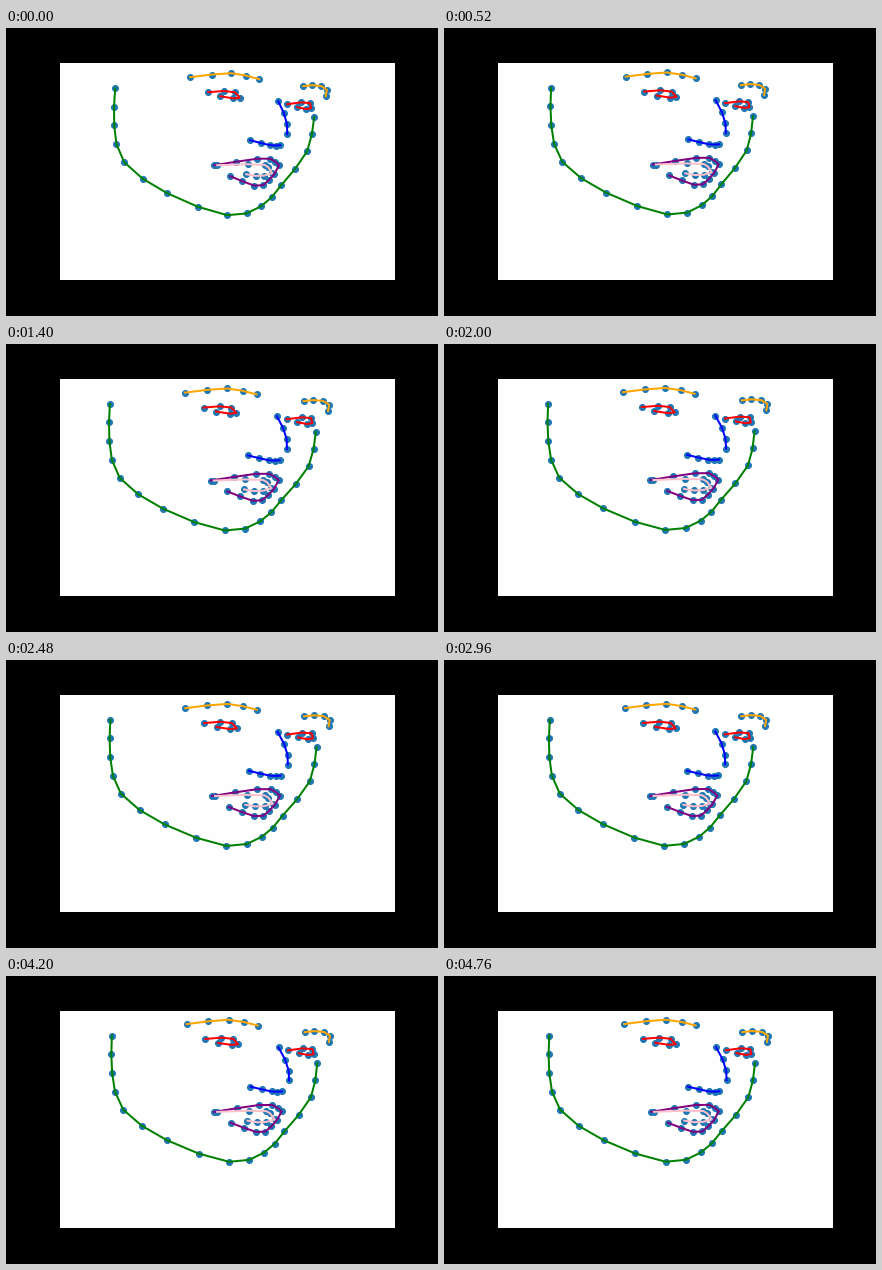
A matplotlib script for the animation above (4.8 s loop, 432 px wide and 288 px high).

```python
import numpy as np
import matplotlib.pyplot as plt
from matplotlib.animation import FuncAnimation

W, H, DPI = 432, 288, 72
FRAMES, STEP = 120, 40


def hermite(knots, values, t):
    """Smooth curve through values (one row per knot), sampled at t."""
    values = np.asarray(values, float)
    slopes = np.gradient(values, knots, axis=0)
    i = np.clip(np.searchsorted(knots, t, side="right") - 1, 0, len(knots) - 2)
    span = (knots[i + 1] - knots[i])[:, None]
    u = (t - knots[i])[:, None] / span
    rise = u * u * (3 - 2 * u)
    bend = span * u * (1 - u) * ((1 - u) * slopes[i] - u * slopes[i + 1])
    return values[i] * (1 - rise) + values[i + 1] * rise + bend


def curve(n, *keys):
    """n evenly spread landmarks on a smooth curve through the key points."""
    return hermite(np.arange(len(keys)), keys, np.linspace(0, len(keys) - 1, n))


jaw = curve(17, (109, 60), (108, 97), (118, 134), (161, 165), (221, 187),
            (255, 178), (275, 157), (301, 123), (308, 89))
left_brow = curve(5, (184, 49), (225, 45), (253, 51))
right_brow = curve(5, (297, 58), (309, 57), (320, 60), (319.5, 68))
bridge = curve(4, (272, 73), (280, 91), (281, 106))
nostrils = curve(5, (244, 112), (264, 117), (274, 117))
left_eye = curve(6, (202, 64), (226, 63), (233, 70.5), (214, 68))
right_eye = curve(6, (281, 76), (302, 74), (304, 81), (291, 79))
outer_lip = np.vstack([curve(6, (208, 137), (259, 130), (273, 137)),
                       curve(6, (268, 146), (253, 158), (224, 148))])
inner_lip = np.vstack([curve(4, (211, 137), (253, 136), (262, 139)),
                       curve(4, (266, 145), (254, 148), (240, 146))])

PARTS = [("green", jaw), ("orange", left_brow), ("orange", right_brow),
         ("blue", bridge), ("blue", nostrils), ("red", left_eye),
         ("red", right_eye), ("purple", outer_lip), ("pink", inner_lip)]

rest = np.vstack([shape for _, shape in PARTS]) + 0.2
cuts = np.cumsum([len(shape) for _, shape in PARTS])[:-1]

# Head poses: time (ms), slide, turn, tilt, lift
POSES = np.array([
    (0, 0, 0, 0, 0),
    (520, -0.1, 1.1, 2.2, 0.7),
    (1400, -3.6, 3.6, 0.9, 0.7),
    (2000, -2.4, 3.6, 2.2, 1.2),
    (2480, -2.6, 3.6, 1.6, 1.2),
    (2960, -2.0, 2.2, 1.0, 1.3),
    (3680, -0.4, 2.7, 2.4, 1.3),
    (4760, -1.6, 3.3, 1.8, 1.4),
])
motion = hermite(POSES[:, 0], POSES[:, 1:], np.arange(FRAMES) * STEP)

# Place of each landmark relative to the middle of the face
across = (rest[:, 0] - 215) / 100
down = (rest[:, 1] - 115) / 70


def pose(frame):
    slide, turn, tilt, lift = motion[frame]
    dx = slide + turn * (across + 0.7 * across ** 2) + tilt * down
    dy = -lift * (1 + 0.6 * across)
    return rest + np.column_stack([dx, dy])


fig = plt.figure(figsize=(W / DPI, H / DPI), dpi=DPI, facecolor="black")
ax = fig.add_axes([0.125, 0.125, 0.775, 0.755], facecolor="#fefefe")
ax.set(xlim=(0.125 * W, 0.9 * W), ylim=(0.875 * H, 0.12 * H),
       xticks=[], yticks=[])
ax.spines[:].set_visible(False)

dots = ax.scatter(rest[:, 0], rest[:, 1], s=36, color="#1f77b4", zorder=1)
lines = [ax.plot([], [], color=color, lw=2, zorder=2)[0] for color, _ in PARTS]


def update(frame):
    points = pose(frame)
    dots.set_offsets(points)
    for line, part in zip(lines, np.split(points, cuts)):
        line.set_data(part[:, 0], part[:, 1])
    return [dots, *lines]


anim = FuncAnimation(fig, update, frames=FRAMES, interval=STEP,
                     repeat=True, repeat_delay=0)
plt.show()
```
